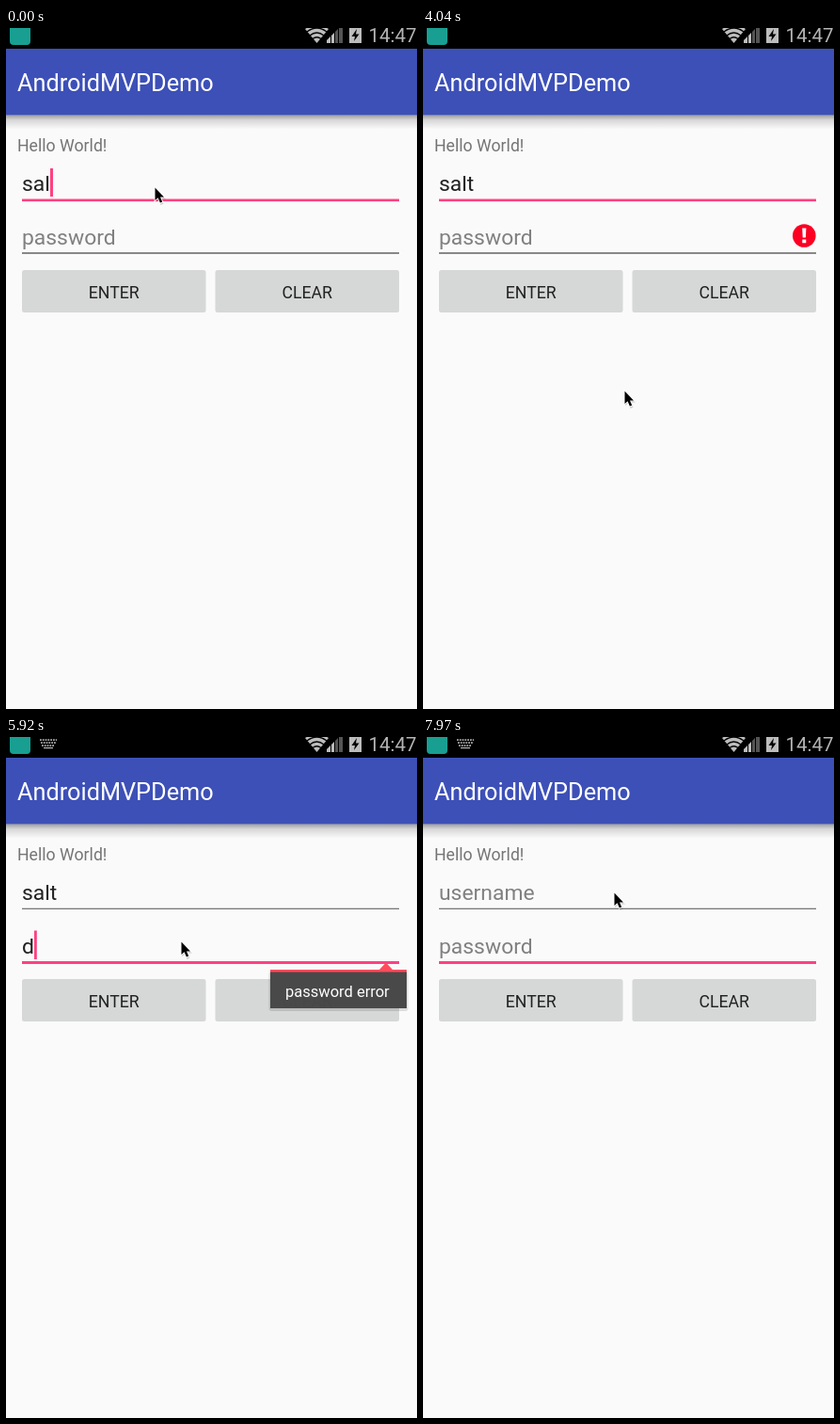
Animation, 437 px wide and 723 px high, one loop 8000 ms. Source, as an HTML page:

```html
<!DOCTYPE html>
<html lang="en">
<head>
<meta charset="utf-8">
<title>Login form</title>
<style>
html, body { margin: 0; width: 100%; height: 100%; overflow: hidden; background: #fafafa; }
svg { position: absolute; left: 0; top: 0; }
text { font-family: Roboto, sans-serif; fill: #212121; }
.field { font-size: 22.9px; }
.small { font-size: 17.7px; }
.muted { fill: #808080; }
.accent { fill: #ff4081; }

/* One cycle is 8000 ms, so 1% = 80 ms. */
.step { animation: 8s step-end infinite; }
.before-switch { animation-name: before-switch; }
.after-switch { animation-name: after-switch; }
.name { animation-name: name; }
.last-letter { animation-name: last-letter; }
.name-hint { animation-name: name-hint; }
.pass-hint { animation-name: pass-hint; }
.d1 { animation-name: d1; }
.d2 { animation-name: d2; }
.d3 { animation-name: d3; }
.name-caret { animation-name: name-caret; }
.pass-caret { animation-name: pass-caret; }
.alert { animation-name: alert; }
.popup { animation: popup 8s linear infinite; }
.pointer { animation: pointer 8s linear infinite; }

@keyframes before-switch { 0% { visibility: visible } 66.625%, 100% { visibility: hidden } }
@keyframes after-switch { 0% { visibility: hidden } 66.625%, 100% { visibility: visible } }
@keyframes name { 0% { visibility: visible } 92%, 100% { visibility: hidden } }
@keyframes last-letter { 0% { visibility: hidden } 5.25% { visibility: visible } 92%, 100% { visibility: hidden } }
@keyframes name-hint { 0% { visibility: hidden } 92%, 100% { visibility: visible } }
@keyframes pass-hint { 0% { visibility: visible } 74% { visibility: hidden } 92%, 100% { visibility: visible } }
@keyframes d1 { 0% { visibility: hidden } 74% { visibility: visible } 92%, 100% { visibility: hidden } }
@keyframes d2 { 0% { visibility: hidden } 76.8% { visibility: visible } 92%, 100% { visibility: hidden } }
@keyframes d3 { 0% { visibility: hidden } 79% { visibility: visible } 92%, 100% { visibility: hidden } }
@keyframes alert { 0% { visibility: hidden } 50.375% { visibility: visible } 74%, 100% { visibility: hidden } }

@keyframes name-caret {
  0% { visibility: visible; transform: translateX(47px) }
  5.25%, 17.75%, 30.25%, 42.75%, 54.25% { visibility: visible; transform: translateX(54px) }
  11.5%, 24%, 36.5%, 49%, 60.75%, 100% { visibility: hidden; transform: translateX(54px) }
}
@keyframes pass-caret {
  0% { visibility: hidden; transform: translateX(17px) }
  66.625% { visibility: visible; transform: translateX(17px) }
  74% { visibility: visible; transform: translateX(30px) }
  76.8% { visibility: visible; transform: translateX(42px) }
  79% { visibility: visible; transform: translateX(55px) }
  85.375% { visibility: hidden; transform: translateX(55px) }
  91.625% { visibility: visible; transform: translateX(55px) }
  92% { visibility: visible; transform: translateX(17px) }
  97.875%, 100% { visibility: hidden; transform: translateX(17px) }
}
@keyframes popup {
  0%, 67.4% { opacity: 0 }
  71.75%, 74% { opacity: 1 }
  76.9%, 100% { opacity: 0 }
}
@keyframes pointer {
  0% { transform: translate(158px, 169px) }
  10% { transform: translate(158px, 169px); animation-timing-function: steps(5, start) }
  13.75% { transform: translate(133px, 217px) }
  15.875% { transform: translate(133px, 217px); animation-timing-function: steps(5, start) }
  19.4375% { transform: translate(122px, 288px) }
  33.25% { transform: translate(122px, 288px); animation-timing-function: steps(2, start) }
  34.75% { transform: translate(133px, 290px); animation-timing-function: steps(4, start) }
  37.5% { transform: translate(208px, 379px); animation-timing-function: steps(3, start) }
  40% { transform: translate(214px, 385px) }
  57.125% { transform: translate(214px, 385px); animation-timing-function: steps(11, start) }
  65% { transform: translate(186px, 217px) }
  81.25% { transform: translate(186px, 217px); animation-timing-function: steps(9, start) }
  89.375% { transform: translate(272px, 273px) }
  95.375% { transform: translate(272px, 273px); animation-timing-function: steps(6, start) }
  99.5%, 100% { transform: translate(203px, 165px) }
}

.spinner {
  position: absolute; left: 19px; top: 327px; width: 46px; height: 46px; border-radius: 50%;
  background: conic-gradient(#bababa, #c6c6c6 100deg, #dedede 190deg, #f3f3f3 280deg, #fafafa 290deg);
  -webkit-mask: radial-gradient(circle, transparent 18.7px, #000 19.3px);
  mask: radial-gradient(circle, transparent 18.7px, #000 19.3px);
  animation: loading 8s step-end infinite, spin 8s infinite;
}
@keyframes loading { 0% { visibility: hidden } 24.75% { visibility: visible } 50.375%, 100% { visibility: hidden } }
@keyframes spin {
  0% { transform: rotate(4deg) }
  24.75% { transform: rotate(4deg); animation-timing-function: steps(35) }
  50.5%, 100% { transform: rotate(-420deg) }
}
</style>
</head>
<body>
<div class="spinner"></div>
<svg width="437" height="723" viewBox="0 0 437 723">
  <defs>
    <linearGradient id="shade" x2="0" y2="1">
      <stop offset="0" stop-opacity=".36"/>
      <stop offset=".35" stop-opacity=".14"/>
      <stop offset="1" stop-opacity="0"/>
    </linearGradient>
  </defs>

  <!-- Status bar -->
  <rect width="437" height="22"/>
  <rect x="4" y="-5" width="22" height="23" rx="4" fill="#189f92"/>
  <g class="step after-switch" fill="none" stroke="#aaa" stroke-width="1.8">
    <path d="M36 3.2H54M37 6.2H53" stroke-dasharray="1.8 1"/>
    <path d="M38 9.2H52" stroke-dasharray="1.8 1"/>
    <path d="M40 11.6H50" stroke-width="1.4"/>
  </g>
  <path d="M318 1Q330.500 -7 343 1L330.500 16Z" fill="#bdbdbd"/>
  <g fill="none" stroke="#000" stroke-width="1.3">
    <path d="M320 4Q330.500 -4 341 4M323 8Q330.500 2 338 8M326 11.500Q330.500 8 335 11.500"/>
  </g>
  <path d="M341 16V13L345 9V16ZM346 16V8L349 5V16Z" fill="#bdbdbd"/>
  <path d="M350 16V4L353 1V16ZM354 16V0H358V16Z" fill="#555"/>
  <rect x="365" y="-2" width="13" height="18" fill="#bdbdbd"/>
  <path d="M373 1L367.500 9H371L370 14L375.500 6.500H372Z"/>
  <text x="385.500" y="14.500" font-size="20.500" style="fill:#b4b4b4">14:47</text>

  <!-- App bar -->
  <rect y="22" width="437" height="70.500" fill="#3d50b7"/>
  <rect y="92.500" width="437" height="15" fill="url(#shade)"/>
  <text x="12" y="67" font-size="25.300" style="fill:#fff">AndroidMVPDemo</text>

  <!-- Form -->
  <text class="small" x="12" y="131" style="fill:#757575">Hello World!</text>

  <text class="field" x="17" y="173"><tspan class="step name">sal</tspan><tspan class="step last-letter">t</tspan></text>
  <text class="field muted step name-hint" x="17" y="173">username</text>
  <rect class="step after-switch" x="17" y="181.700" width="401" height="1.300" fill="#777"/>
  <rect class="accent step before-switch" x="17" y="181.500" width="401" height="2.600"/>
  <rect class="accent step name-caret" y="149" width="3" height="30"/>

  <text class="field" x="17" y="230"><tspan class="step d1">d</tspan><tspan class="step d2">d</tspan><tspan class="step d3">d</tspan></text>
  <text class="field muted step pass-hint" x="17" y="230">password</text>
  <rect class="step before-switch" x="17" y="238" width="401" height="2" fill="#888"/>
  <rect class="accent step after-switch" x="17" y="238" width="401" height="3"/>
  <rect class="accent step pass-caret" y="205.500" width="2.800" height="30.500"/>

  <g fill="#d6d7d7">
    <rect x="17" y="257" width="195.500" height="45" rx="2.500"/>
    <rect x="222.500" y="257" width="195.500" height="45" rx="2.500"/>
  </g>
  <g class="small" text-anchor="middle">
    <text x="114.700" y="286.500">ENTER</text>
    <text x="320.200" y="286.500">CLEAR</text>
  </g>

  <!-- Password error -->
  <g class="step alert">
    <circle cx="405.300" cy="220.500" r="12.300" fill="#fb0022"/>
    <path d="M403.200 212.500H407.400L406.900 222.500H403.700ZM403.300 224.500H407.300V228.300H403.300Z" fill="#fff"/>
  </g>
  <g class="popup">
    <rect x="279.500" y="249" width="148" height="42" rx="3" opacity=".12"/>
    <rect x="281" y="247.500" width="145" height="40.500" fill="#484848"/>
    <path d="M281 247H397L404 239.500L411 247H426V249.500H281Z" fill="#ff4a5a"/>
    <text x="297" y="276" font-size="16.500" style="fill:#fff">password error</text>
  </g>

  <!-- Mouse pointer -->
  <g class="pointer">
    <path d="M1 2V16L4 13.500L6.500 19L9.500 17.500L7.500 12.500H12Z" opacity=".18"/>
    <path d="M.5 .5V14L3.600 11.200L5.900 16.500L8.200 15.500L6 10.400H10Z" stroke="#fff" stroke-width="1.800" paint-order="stroke"/>
  </g>
</svg>
</body>
</html>
```
